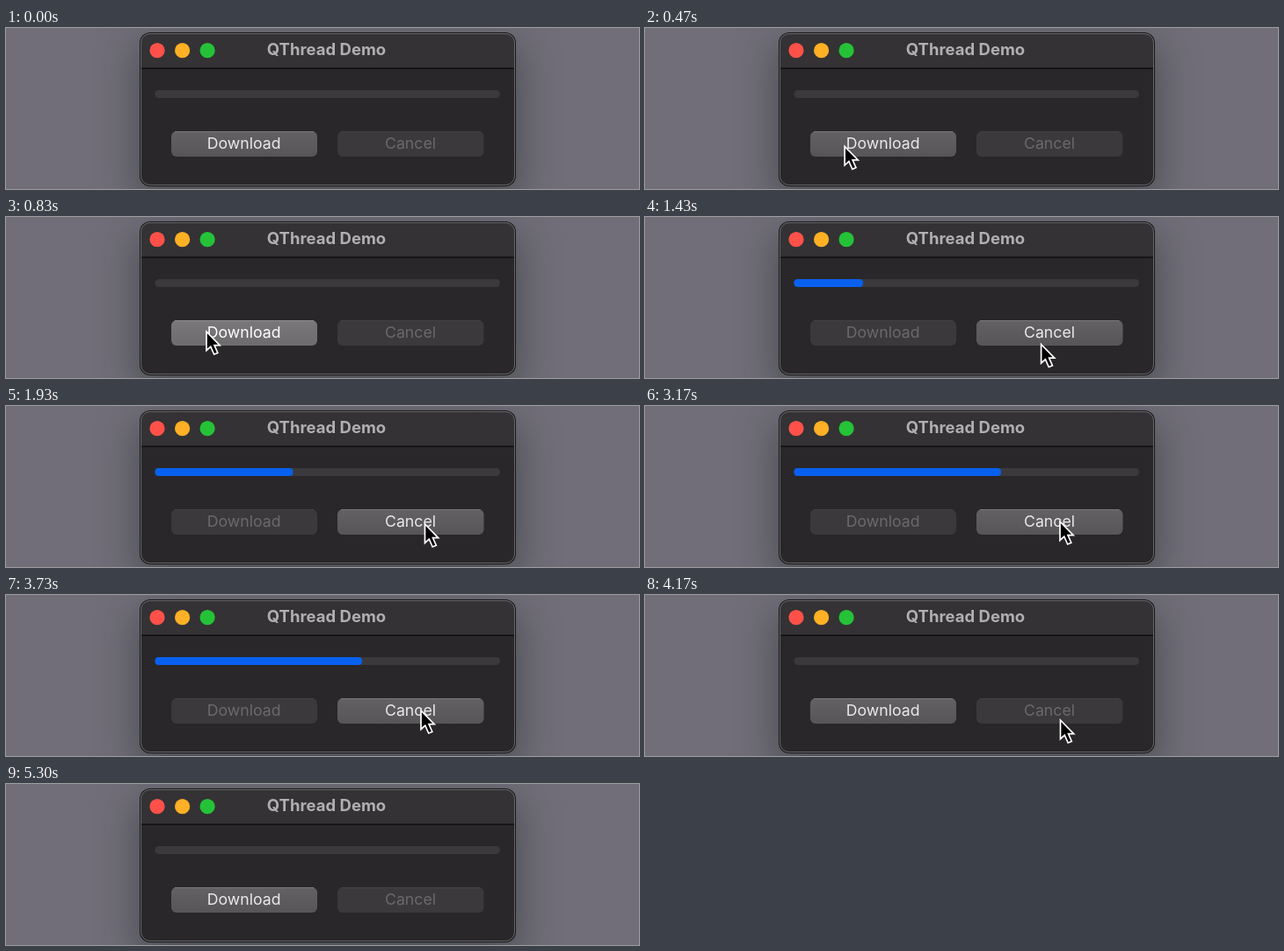
An HTML page for the animation above (5.36 s loop, 720x184 px).

```html
<!DOCTYPE html>
<html lang="en">
<head>
<meta charset="utf-8">
<title>QThread Demo</title>
<style>
  html, body { margin: 0; width: 100%; height: 100%; overflow: hidden; background: #716e79; }
  #stage { position: relative; width: 720px; height: 184px; overflow: hidden; background: #716e79; }
  .window {
    position: absolute; left: 153px; top: 6px; width: 426px; height: 174px;
    border-radius: 11px; background: #292729;
    box-shadow: 0 0 0 1px #171718, 0 16px 44px 4px rgba(36, 46, 44, .5);
  }
  svg { position: absolute; left: 0; top: 0; display: block; }
  text { font-family: Inter, Roboto, sans-serif; text-anchor: middle; }
  .title { font-size: 18.5px; font-weight: 700; fill: #b1afb1; }
  .button text { font-size: 17.7px; fill: #ebe9eb; }
  .button .face { fill: url(#face); }
  .button .edge { stroke: #7b797b; }
  .button.down .face { fill: url(#pressed); }
  .button.down .edge { stroke: #908e90; }
  .button.down text { fill: #fff; }
  .button.off .face { fill: #3b393b; }
  .button.off .edge { stroke: #444244; }
  .button.off text { fill: #6b696b; }
</style>
</head>
<body>
<div id="stage">
  <div class="window"></div>
  <svg width="720" height="184" viewBox="0 0 720 184">
    <defs>
      <linearGradient id="face" x2="0" y2="1">
        <stop stop-color="#636163"/><stop offset="1" stop-color="#575557"/>
      </linearGradient>
      <linearGradient id="pressed" x2="0" y2="1">
        <stop stop-color="#7a787a"/><stop offset="1" stop-color="#6d6b6d"/>
      </linearGradient>
    </defs>

    <path d="M153 46V17a11 11 0 0 1 11-11H568a11 11 0 0 1 11 11V46Z" fill="#343234"/>
    <path d="M153 46.2H579" stroke="#090809" stroke-width="1.2"/>
    <rect x="153.5" y="6.5" width="425" height="173" rx="10.5" fill="none" stroke="#69676a"/>
    <circle cx="172" cy="25.7" r="8.6" fill="#ff5149"/>
    <circle cx="200.6" cy="25.7" r="8.6" fill="#ffb025"/>
    <circle cx="229.1" cy="25.7" r="8.6" fill="#25c238"/>
    <text class="title" x="364.5" y="31.4">QThread Demo</text>

    <rect x="169.5" y="71" width="392.5" height="9" rx="4.5" fill="#3b393b"/>
    <rect id="bar" x="169.5" y="71" width="0" height="9" rx="4" fill="#0860ef"/>

    <g id="download" class="button" transform="translate(188 118)">
      <rect class="face" width="166" height="29" rx="6"/>
      <path class="edge" d="M4 .5H162"/>
      <text x="82.7" y="20.2">Download</text>
    </g>
    <g id="cancel" class="button off" transform="translate(377 118)">
      <rect class="face" width="166.5" height="29" rx="6"/>
      <path class="edge" d="M4 .5H162.5"/>
      <text x="83" y="20.2">Cancel</text>
    </g>

    <path id="cursor" d="M0 0V21.5L4.8 17.1L8.7 26L12.8 24.2L9 15.6H15.2Z"
          fill="#000" stroke="#fff" stroke-width="1.7" stroke-linejoin="miter"/>
  </svg>
</div>
<script>
  const LOOP = 5360;
  const byId = id => document.getElementById(id);
  const bar = byId('bar'), cursor = byId('cursor');

  // Pointer tip: time, x, y
  const path = [
    [70, 219, 186], [250, 223, 160], [450, 227, 136], [600, 228, 131],
    [1000, 228, 131], [1170, 290, 138], [1310, 405, 145], [1430, 450.5, 145.5],
    [1580, 466, 144], [1720, 480, 139], [1930, 476.5, 135], [2270, 472, 132],
    [3890, 472, 132], [4100, 472.5, 143]
  ];
  const HIDE = 4400;

  // Held values: time, value
  const progress = [[0, 0], [970, .2], [1900, .4], [2830, .6], [3880, 0]];
  const downloadState = [[0, ''], [770, 'down'], [900, 'off'], [3880, '']];
  const cancelState = [[0, 'off'], [900, ''], [3780, 'down'], [3880, 'off']];

  const held = (steps, t) => steps.filter(s => s[0] <= t).pop()[1];

  function pointAt(t) {
    const i = path.findIndex(p => p[0] > t);
    if (i < 0) return path[path.length - 1].slice(1);
    if (i === 0) return path[0].slice(1);
    const a = path[i - 1], b = path[i];
    const k = (t - a[0]) / (b[0] - a[0]);
    return [a[1] + (b[1] - a[1]) * k, a[2] + (b[2] - a[2]) * k];
  }

  function draw() {
    const t = performance.now() % LOOP;
    bar.setAttribute('width', 392.5 * held(progress, t));
    byId('download').setAttribute('class', 'button ' + held(downloadState, t));
    byId('cancel').setAttribute('class', 'button ' + held(cancelState, t));
    const [x, y] = pointAt(t);
    cursor.setAttribute('transform', `translate(${x} ${y})`);
    cursor.setAttribute('visibility', t >= 70 && t < HIDE ? 'visible' : 'hidden');
    requestAnimationFrame(draw);
  }
  draw();
</script>
</body>
</html>
```
